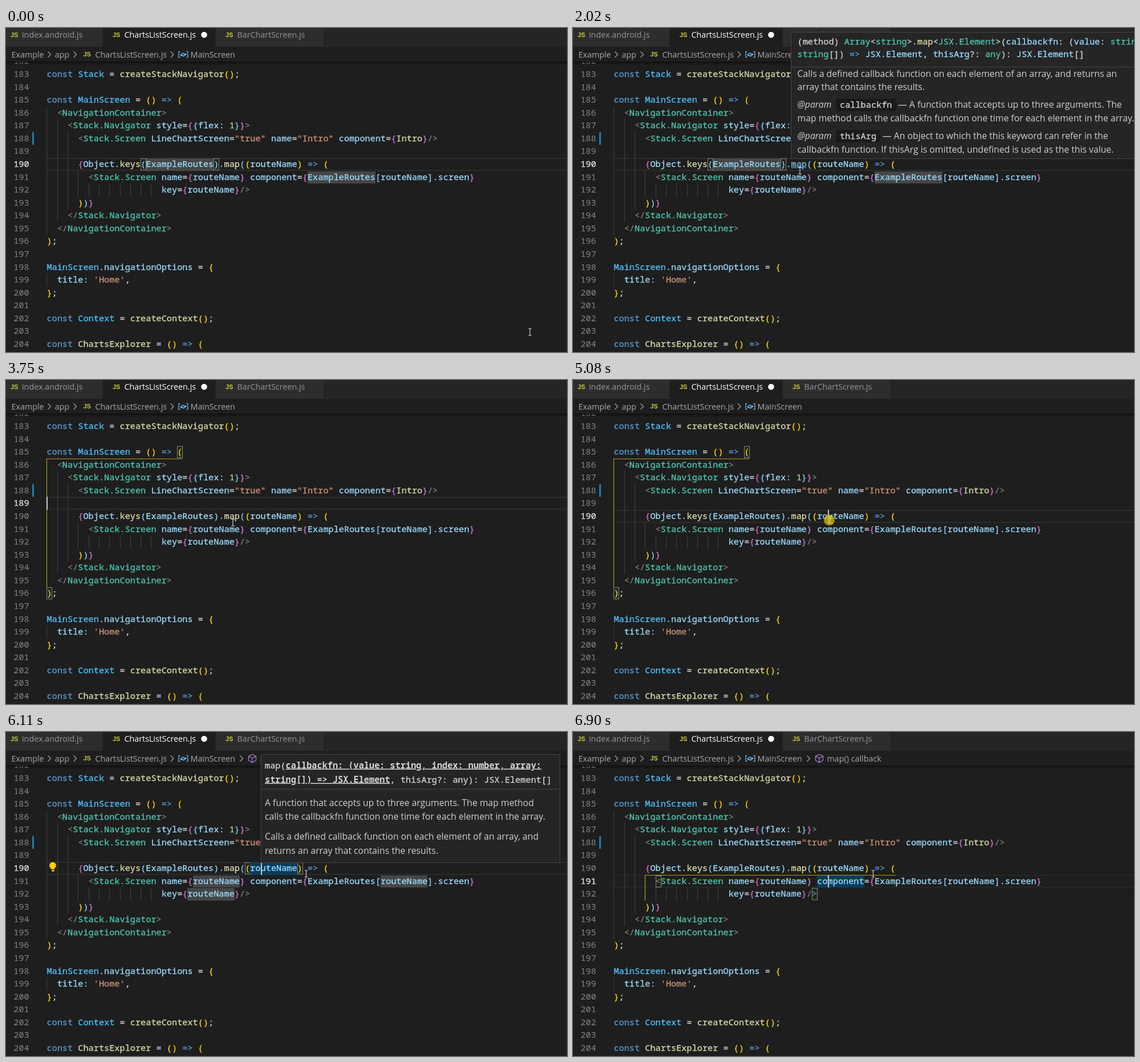
An HTML page that plays this animation: 984 by 569 pixels, repeating every 6.97 s.

```html
<!DOCTYPE html>
<html lang="en">
<head>
<meta charset="utf-8">
<title>Code editor hints</title>
<style>
html, body { margin: 0; width: 100%; height: 100%; overflow: hidden; background: #1e1e1e }
svg { display: block; width: 100%; height: 100% }
text { white-space: pre; stroke-width: .3 }
.mono { font: 15.25px "Noto Sans Mono", "DejaVu Sans Mono", monospace }
.ui { font: 14.3px "Open Sans", "Noto Sans", sans-serif }
.doc { font: 15.75px "Open Sans", "Noto Sans", sans-serif; fill: #d0d0d0 }
.js { font: bold 11px "Liberation Sans", sans-serif; fill: #cbcb41 }
.sig { font-weight: bold; text-decoration: underline }
rect { shape-rendering: crispEdges }
.line { fill: none; stroke-width: 1.2 }
</style>
</head>
<body>
<svg id="stage" viewBox="0 0 984 569"></svg>
<script>
const LOOP = 6970, X0 = 71.4, CW = 9.15, LH = 22.57;
const colX = c => X0 + c * CW;
const top_ = n => 228 + (n - 190) * LH;
const base = n => top_(n) + 16;

// Colour keys used after "~" in code strings
const palette = {
  d: '#d4d4d4', k: '#569cd6', v: '#4fc1ff', p: '#9cdcfe', f: '#dcdcaa', t: '#4ec9b0',
  g: '#808080', s: '#ce9178', n: '#b5cea8', 1: '#ffd700', 2: '#da70d6', 3: '#87cefa', u: '#d4d4d4'
};
const esc = s => s.replace(/&/g, '&amp;').replace(/</g, '&lt;');
const rect = (x, y, w, h, fill, more = '') =>
  `<rect x="${x}" y="${y}" width="${w}" height="${h}" fill="${fill}" ${more}/>`;
const text = (cls, x, y, s, fill) =>
  `<text class="${cls}" x="${x}" y="${y}"${fill ? ` fill="${fill}"` : ''}>${esc(s)}</text>`;
const path = (d, stroke, more = '') => `<path class="line" d="${d}" stroke="${stroke}" ${more}/>`;
const span = p => {
  const ink = palette[p[0]];
  return `<tspan fill="${ink}" ${p[0] === 'u' ? 'class="sig"' : `stroke="${ink}"`}>${esc(p.slice(1))}</tspan>`;
};
const code = (x, y, src) =>
  `<text class="mono" x="${x}" y="${y}">${src.split('~').slice(1).map(span).join('')}</text>`;
const docs = (x, lines) => lines.map(([y, s]) => text('doc', x, y, s)).join('');
// Content shown in each "from to" pair of milliseconds
const timed = (spans, body) => `<g data-on="${spans}">${body}</g>`;

const source = {
  183: [0, '~kconst ~vStack ~d= ~fcreateStackNavigator~1()~d;'],
  185: [0, '~kconst ~vMainScreen ~d= ~1() ~k=> ~1('],
  186: [2, '~g<~tNavigationContainer~g>'],
  187: [4, '~g<~tStack.Navigator ~pstyle~d=~2{~3{~pflex: ~n1~3}~2}~g>'],
  188: [6, '~g<~tStack.Screen ~pLineChartScreen~d=~s"true" ~pname~d=~s"Intro" ~pcomponent~d=~2{~fIntro~2}~g/>'],
  190: [6, '~2{~pObject~d.~fkeys~3(~pExampleRoutes~3)~d.~fmap~3(~1(~prouteName~1) ~k=> ~1('],
  191: [8, '~g<~tStack.Screen ~pname~d=~2{~prouteName~2} ~pcomponent~d=~2{~pExampleRoutes~3[~prouteName~3]~d.~pscreen~2}'],
  192: [22, '~pkey~d=~2{~prouteName~2}~g/>'],
  193: [6, '~1)~3)~2}'],
  194: [4, '~g</~tStack.Navigator~g>'],
  195: [2, '~g</~tNavigationContainer~g>'],
  196: [0, '~1)~d;'],
  198: [0, '~vMainScreen~d.~pnavigationOptions ~d= ~1{'],
  199: [2, "~ptitle: ~s'Home'~d,"],
  200: [0, '~1}~d;'],
  202: [0, '~kconst ~vContext ~d= ~fcreateContext~1()~d;'],
  204: [0, '~kconst ~fChartsExplorer ~d= ~1() ~k=> ~1(']
};

const number = (n, fill) => text('mono', 13.2, base(n), String(n), fill);
const guide = (c, from, to) => rect(Math.round(colX(c)), top_(from), 1, (to - from + 1) * LH, '#404040');
const mark = (n, c, len, fill = '#575757b8') => rect(colX(c), top_(n) + 1, len * CW, LH - 1, fill);
const strong = '#004972b8';
const box = (n, c) => rect(Math.round(colX(c)) + .5, Math.round(top_(n)) + 1.5, 9, 20, '#0064001a', 'stroke="#888"');
const caret = (n, c) => rect(Math.round(colX(c)), top_(n), 2, LH, '#c8c8c8');
const current = n => rect(72, top_(n), 912, 1.5, '#2c2c2c') + rect(72, top_(n) + 21, 912, 1.5, '#2c2c2c');
const scope = (c, end, from, to) =>
  path(`M${colX(end)} ${Math.round(top_(from)) + .5}H${Math.round(colX(c)) + .5}V${top_(to)}`, '#b3981a');

function editor() {
  const active = [[190, '0 3680 5080 6660'], [189, '3680 5080'], [191, '6660 6970']];
  let s = active.map(([n, on]) => timed(on, current(n))).join('');
  s += guide(0, 186, 195) + guide(2, 187, 194) + guide(4, 188, 193) + guide(6, 191, 192) + guide(0, 199, 199) + guide(0, 205, 205);
  for (let c = 8; c < 22; c += 2) s += guide(c, 192, 192);
  s += rect(46, top_(188), 3, LH, '#1b81a8');
  s += timed('0 3750', mark(190, 19, 13) + mark(191, 50, 13) + box(190, 18) + box(190, 32));
  s += timed('3750 5170', scope(0, 26, 186, 196) + box(185, 25) + box(196, 0));
  s += timed('5170 6740', box(190, 38) + box(190, 48));
  s += timed('5330 6740', mark(190, 39, 9, strong) + mark(191, 28, 9) + mark(191, 64, 9) + mark(192, 27, 9));
  s += timed('6740 6970', scope(6, 54, 191, 193) + box(191, 8) + box(192, 38));
  s += timed('6900 6970', mark(191, 39, 9, strong));
  for (let n = 182; n < 205; n++) {
    s += number(n, '#858585');
    if (source[n]) s += code(colX(source[n][0]), base(n), source[n][1]);
  }
  s += active.map(([n, on]) => timed(on, code(13.2, base(n), '~d' + n))).join('');
  s += timed('1930 2250', code(colX(34), base(190), '~kmap') + rect(Math.round(colX(34)), 245, 27, 1, palette.k));
  s += timed('450 930 1330 1930 2400 2870 3360 3680', caret(190, 19));
  s += timed('3680 4130 4600 5080', caret(189, 0));
  s += timed('5080 5620 6110 6660', caret(190, 41));
  s += timed('6660 6970', caret(191, 41));
  s += timed('5410 6660', '<path d="M79 241C79 238 76 238 76 234.500A6 6 0 0 1 88 234.500C88 238 85 238 85 241Z" fill="#fc0"/>' +
    rect(79.5, 242, 5, 3, '#d8b000'));
  return s;
}

const crumb = '#a9a9a9';
const chevron = x => path(`M${x - 3} 41.500l5 5-5 5`, crumb);
function header() {
  const tab = (x, w, name, fill, ink) => rect(x, 0, w, 33, fill) +
    text('js', x + (x ? 17 : 8), 16, 'JS') + text('ui', x + (x ? 37.5 : 28), 17, name, ink);
  return rect(0, 0, 984, 59, '#1e1e1e') + rect(0, 0, 984, 33, '#252526') +
    tab(0, 169, 'index.android.js', '#2d2d2d', '#969696') +
    tab(170, 197, 'ChartsListScreen.js', '#1e1e1e', '#fff') +
    tab(368, 189, 'BarChartScreen.js', '#2d2d2d', '#969696') +
    '<circle cx="347.500" cy="12" r="5.300" fill="#fff"/>' +
    text('ui', 9.5, 51.5, 'Example', crumb) + chevron(76.5) + text('ui', 85.5, 51.5, 'app', crumb) + chevron(121.5) +
    text('js', 135.5, 50, 'JS') + text('ui', 156.5, 51.5, 'ChartsListScreen.js', crumb) + chevron(292) +
    path('M306 41.500h-3v10h3M316 41.500h3v10h-3M306 47l4-3 6 2-4 3.500-5-1zM307 48l9-2', '#75beff') +
    text('ui', 323.5, 51.5, 'MainScreen', crumb) +
    timed('5410 6970', chevron(413.5) +
      path('M432 39.500l6.500 3v7.500l-6.500 3.500-6.500-3.500v-7.500zM425.500 42.500l6.500 3.500 6.500-3.500M432 46v7', '#b180d7') +
      text('ui', 445.5, 51.5, 'map() callback', crumb)) +
    rect(0, 59, 984, 6, 'url(#shade)');
}

const panel = (x, y, w, h) => rect(x + .5, y + .5, w - 1, h - 1, '#252526', 'stroke="#454545"');
function hover() {
  const param = (y, name, after, rest) => {
    const w = name.length * CW;
    return `<text class="doc" x="393.500" y="${y}" style="font-style:italic">@param</text>` +
      rect(461, y - 16, w + 14, 22, '#1a1a1b', 'rx="3"') + code(468, y, '~d' + name) + text('doc', after, y, rest);
  };
  return `<g id="hover">${panel(382, 7, 620, 223)}${rect(383, 68, 601, 1, '#454545')}` +
    code(393.5, 29, '~d(method) ~tArray~d<~tstring~d>.~fmap~d<~tJSX.Element~d>(~pcallbackfn~d: (~pvalue~d: ~tstring') +
    code(393.5, 51, '~tstring~d[]) ~k=> ~pJSX.Element~d, ~pthisArg~d?: ~tany~d): ~pJSX.Element~d[]') +
    docs(393.5, [
      [85.5, 'Calls a defined callback function on each element of an array, and returns an'],
      [108.5, 'array that contains the results.'],
      [164, 'map method calls the callbackfn function one time for each element in the array.'],
      [219, 'callbackfn function. If thisArg is omitted, undefined is used as the this value.']]) +
    param(140, 'callbackfn', 570, '— A function that accepts up to three arguments. The') +
    param(195, 'thisArg', 543, '— An object to which the this keyword can refer in the') + '</g>';
}

function hints() {
  const overload = (n, type) => code(285.5, 63.5, `~dkeys(~uo: ${type}~d): string[]`) +
    text('mono', 248.5, 208, n + '/2', '#8a8a8a');
  const keys = panel(245, 39, 525, 191) + rect(278, 40, 1, 189, '#3c3c3c') + rect(279, 75, 490, 1, '#454545') +
    path('M256.500 188l6-5.500 6 5.500M256.500 216.500l6 5.500 6-5.500', '#c5c5c5') +
    docs(285.5, [
      [104.5, 'Object that contains the properties and methods. This can be an'],
      [129.5, 'object that you created or an existing Document Object Model'],
      [154, '(DOM) object.'],
      [189, 'Returns the names of the enumerable string properties and'],
      [213.5, 'methods of an object.']]);
  const map = panel(447, 39, 525, 191) + rect(448, 100, 523, 1, '#454545') +
    code(454, 63.5, '~dmap(~ucallbackfn: (value: string, index: number, array:') +
    code(454, 88.5, '~ustring[]) => JSX.Element~d, thisArg?: any): JSX.Element[]') +
    docs(454, [
      [129.5, 'A function that accepts up to three arguments. The map method'],
      [154, 'calls the callbackfn function one time for each element in the array.'],
      [189, 'Calls a defined callback function on each element of an array, and'],
      [213.5, 'returns an array that contains the results.']]);
  return timed('2250 3360', keys) + timed('2250 3050', overload(1, '{}')) + timed('3050 3360', overload(2, 'object')) +
    timed('6020 6660', map);
}

const click = (x, y) => `<circle cx="${x}" cy="${y}" r="9.500" fill="#d6bd00" opacity=".75"/>`;
const stage = document.getElementById('stage');
stage.innerHTML = '<defs><linearGradient id="shade" x2="0" y2="1"><stop stop-opacity=".5"/>' +
  '<stop offset="1" stop-opacity="0"/></linearGradient></defs>' +
  editor() + header() + hover() + hints() +
  timed('1250 1410', click(249.5, 238)) + timed('5080 5170', click(449.5, 246)) +
  `<g id="mouse">${path('M-3-6h2l1 1 1-1h2M0-5V5M-3 6h2l1-1 1 1h2', '#ccc')}</g>`;

const groups = [...stage.querySelectorAll('[data-on]')].map(el => [el, el.dataset.on.split(' ').map(Number)]);
const hoverBox = document.getElementById('hover'), mouse = document.getElementById('mouse');

// Pointer keyframes: time, x, y
const route = [
  [0, 919, 534], [60, 919, 534], [300, 560, 330], [480, 190, 173], [560, 141, 215], [700, 279, 262],
  [1230, 251, 237], [1430, 251, 237], [1550, 398, 250.5], [4300, 398, 250.5], [4990, 451, 245.500],
  [5100, 451, 245.500], [5410, 526.5, 249], [LOOP, 526.5, 249]
];
function pointer(t) {
  const i = route.findIndex(k => k[0] > t), [ta, xa, ya] = route[i - 1], [tb, xb, yb] = route[i];
  const u = (t - ta) / (tb - ta);
  return [xa + (xb - xa) * u, ya + (yb - ya) * u];
}

function draw(now) {
  const t = now % LOOP;
  for (const [el, on] of groups)
    el.style.display = on.some((a, i) => i % 2 === 0 && t >= a && t < on[i + 1]) ? '' : 'none';
  hoverBox.style.display = t >= 1930 && t < 2250 ? '' : 'none';
  hoverBox.style.opacity = Math.min(1, (t - 1930) / 90);
  mouse.setAttribute('transform', `translate(${pointer(t)})`);
}
const start = performance.now();
function tick() {
  draw(performance.now() - start);
  requestAnimationFrame(tick);
}
tick();
</script>
</body>
</html>
```
